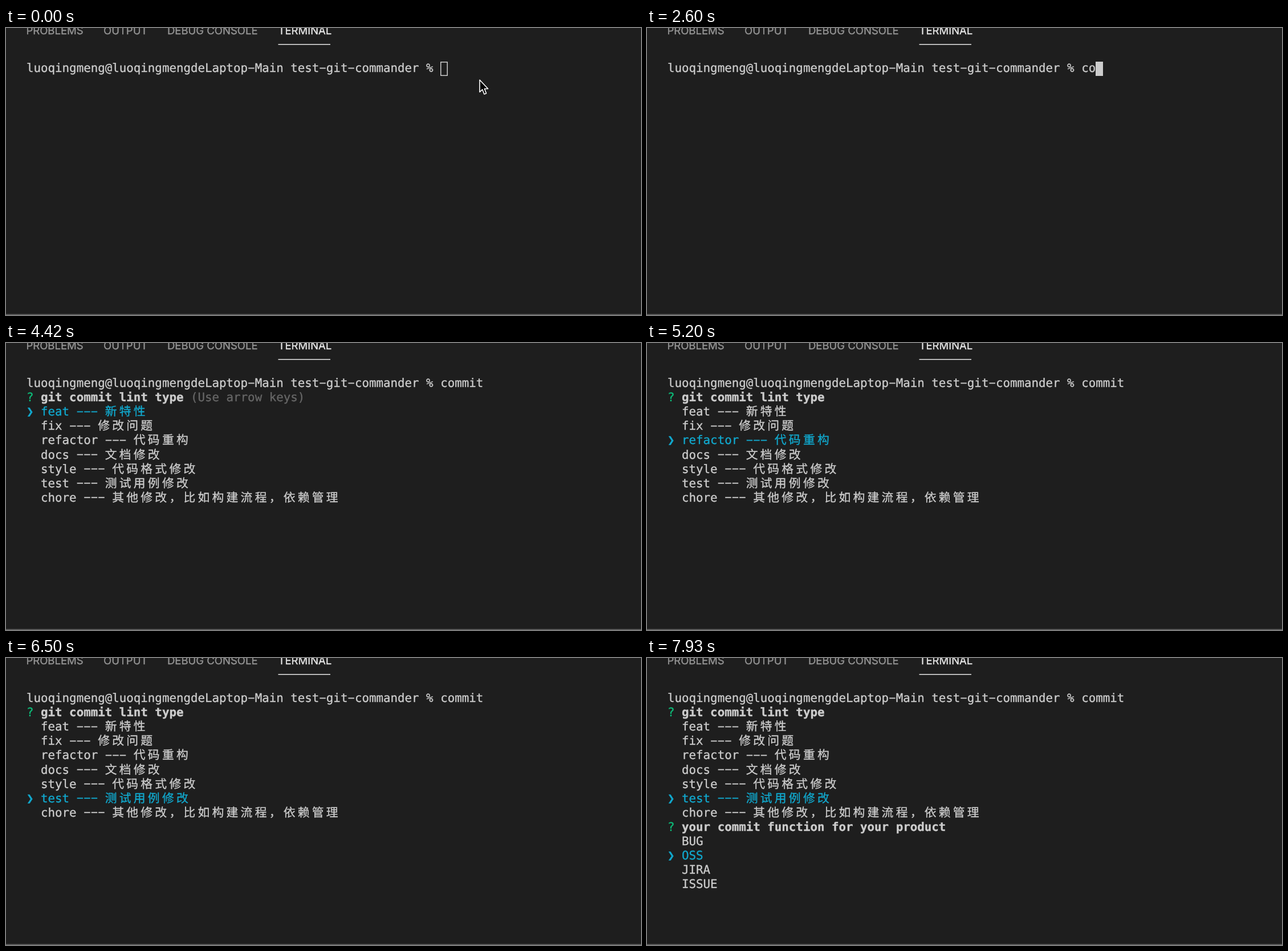
An HTML page with a canvas for the animation above (8000 ms loop, 1114 px wide and 503 px high).

```html
<!DOCTYPE html>
<html lang="en">
<head>
<meta charset="utf-8">
<title>Terminal commit prompt</title>
<style>
  html, body { margin: 0; width: 100%; height: 100%; overflow: hidden; background: #1e1e1e; }
  canvas { display: block; }
</style>
</head>
<body>
<canvas id="stage" width="1114" height="503"></canvas>
<script>
const ctx = document.getElementById('stage').getContext('2d');
const LOOP = 8000;
const LEFT = 36, TOP = 59, COL = 12.52, ROW = 25.04, BASE = 18.3;
const FG = '#cccccc', CYAN = '#11a8cd', GREEN = '#0dbc79', GREY = '#666666';
const MONO = '20.8px "DejaVu Sans Mono", "Noto Sans CJK SC", "Noto Sans CJK", monospace';

const PROMPT = 'luoqingmeng@luoqingmengdeLaptop-Main test-git-commander % ';
const HINT = '(Use arrow keys)';
const TYPES = [
  'feat --- 新特性',
  'fix --- 修改问题',
  'refactor --- 代码重构',
  'docs --- 文档修改',
  'style --- 代码格式修改',
  'test --- 测试用例修改',
  'chore --- 其他修改，比如构建流程，依赖管理'
];
const PRODUCTS = ['BUG', 'OSS', 'JIRA', 'ISSUE'];

// Each track lists [start time, value] in order.
const TYPED = [[0, ''], [1690, 'g'], [2080, ''], [2340, 'c'], [2470, 'co'],
  [2730, 'com'], [2990, 'comm'], [3120, 'commi'], [3250, 'commit']];
const TYPE_PICK = [[0, 0], [4810, 1], [5200, 2], [5460, 3], [5850, 4], [6240, 5]];
const PRODUCT_PICK = [[0, 0], [7540, 1]];
const FOCUS = 910, ENTER = 3510, FIRST_LIST = 4030, SECOND_LIST = 6760;

const valueAt = (track, t) => track.filter(([start]) => start <= t).pop()[1];
const cellX = col => LEFT + col * COL;
const cellY = row => TOP + row * ROW;

// A hairline outline gives the slightly heavy look of smoothed screen text.
function inkText(text, x, y, color) {
  ctx.fillStyle = ctx.strokeStyle = color;
  ctx.lineWidth = 0.35;
  ctx.fillText(text, x, y);
  ctx.strokeText(text, x, y);
}

// Draws on the cell grid and returns the next free column.
function write(text, col, row, color = FG, bold = false) {
  ctx.font = (bold ? 'bold ' : '') + MONO;
  ctx.fillStyle = color;
  const base = cellY(row) + BASE;
  for (const ch of text) {
    const x = cellX(col);
    if (ch === '-') ctx.fillRect(x + 1, base - 7.8, 10.5, 1.9);
    else if (ch !== ' ') inkText(ch, x, base, color);
    col += ch > '\u2fff' ? 2 : 1;
  }
  return col;
}

function drawList(question, items, pick, row, hint) {
  write('?', 0, row, GREEN);
  const end = write(question, 2, row, FG, true);
  if (hint) write(HINT, end + 1, row, GREY);
  items.forEach((item, i) => {
    const y = row + 1 + i;
    if (i === pick) write('❯', 0, y, CYAN);
    write(item, 2, y, i === pick ? CYAN : FG);
  });
}

function drawCaret(col, row, solid) {
  const x = Math.floor(cellX(col)), y = Math.floor(cellY(row));
  if (solid) {
    ctx.fillStyle = FG;
    ctx.fillRect(x, y, 13, 25);
  } else {
    ctx.strokeStyle = FG;
    ctx.lineWidth = 1.5;
    ctx.strokeRect(x + 0.75, y + 0.75, 11.5, 23.5);
  }
}

function drawPointer(x, y) {
  const points = [[0, 0], [0, 21.2], [4.7, 16.8], [8, 25], [11.6, 23.5], [8.4, 15.5], [14.6, 15.5]];
  ctx.beginPath();
  points.forEach(([dx, dy]) => ctx.lineTo(x + dx, y + dy));
  ctx.closePath();
  ctx.fillStyle = '#000';
  ctx.fill();
  ctx.strokeStyle = '#fff';
  ctx.lineWidth = 1.6;
  ctx.stroke();
}

function drawPanel() {
  ctx.fillStyle = '#1e1e1e';
  ctx.fillRect(0, 0, 1114, 503);
  ctx.font = '18.5px Inter, sans-serif';
  const tabs = [['PROBLEMS', 35.5], ['OUTPUT', 171], ['DEBUG CONSOLE', 283], ['TERMINAL', 477.5]];
  for (const [name, x] of tabs) {
    inkText(name, x, 10.7, name === 'TERMINAL' ? '#e7e7e7' : '#959595');
  }
  ctx.fillStyle = '#e7e7e7';
  ctx.fillRect(477.5, 28, 91.5, 1.5);
  ctx.fillStyle = '#606060';
  ctx.fillRect(0, 501.4, 1114, 1.6);
}

function draw(t) {
  drawPanel();
  const end = write(PROMPT + valueAt(TYPED, t), 0, 0);
  if (t < ENTER) drawCaret(end, 0, t >= FOCUS);
  else if (t < FIRST_LIST) drawCaret(0, 1, true);
  if (t < FOCUS) drawPointer(831, 91);

  if (t >= FIRST_LIST) {
    const pick = valueAt(TYPE_PICK, t);
    drawList('git commit lint type', TYPES, pick, 1, pick === 0);
  }
  if (t >= SECOND_LIST) {
    const pick = valueAt(PRODUCT_PICK, t);
    drawList('your commit function for your product', PRODUCTS, pick, 9, pick === 0);
  }
}

ctx.textRendering = 'geometricPrecision';
ctx.lineJoin = 'round';
const began = performance.now();
function tick() {
  draw((performance.now() - began) % LOOP);
  requestAnimationFrame(tick);
}
tick();
</script>
</body>
</html>
```
